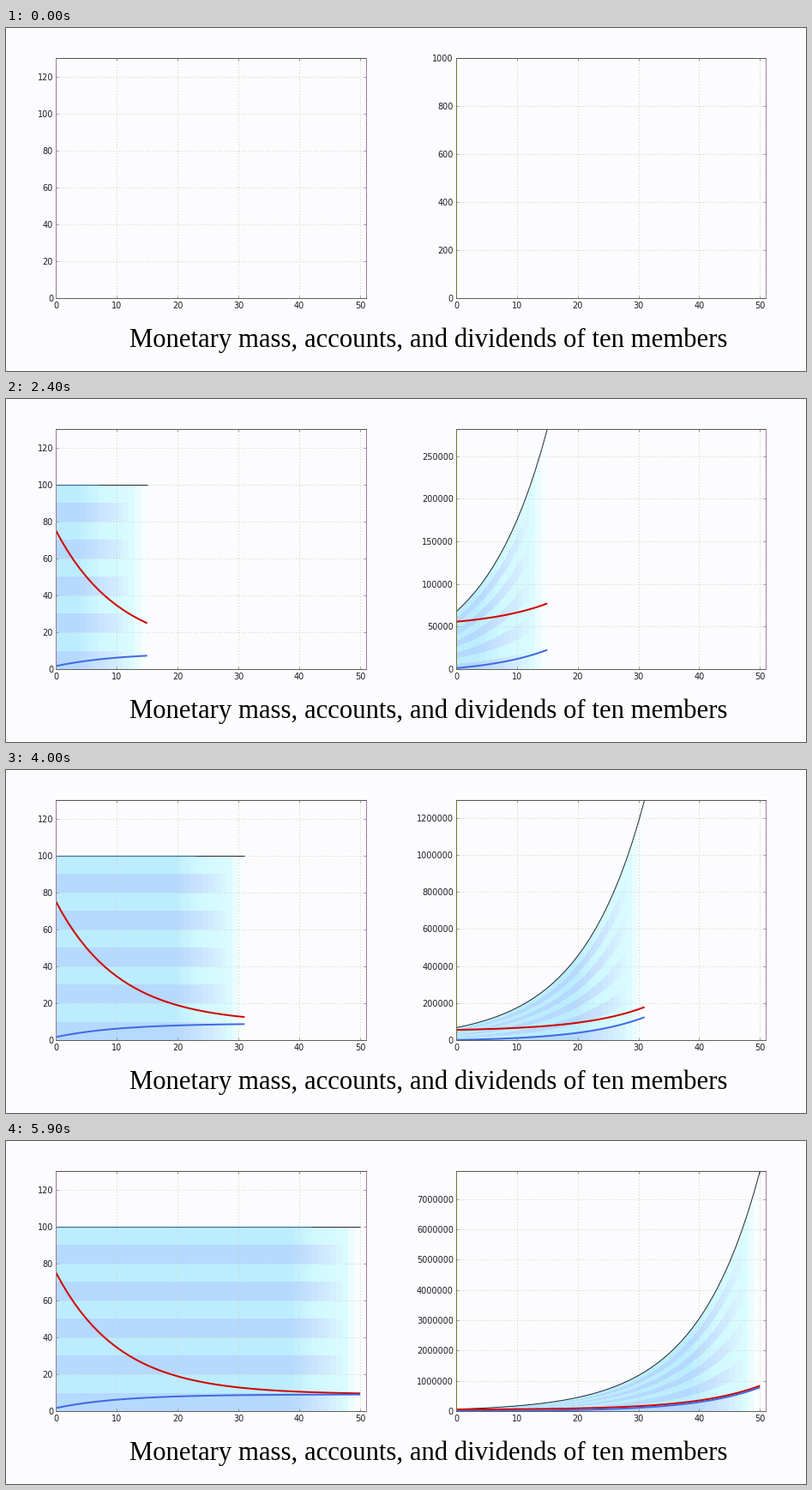
Recreate the animation shown at these times as a matplotlib script. Size 933 px wide and 400 px high, loop 6000 ms.

```python
import numpy as np
import matplotlib.pyplot as plt
from matplotlib.animation import FuncAnimation
from matplotlib.collections import PolyCollection
from matplotlib.colors import to_rgb
from matplotlib.ticker import FuncFormatter, MaxNLocator, MultipleLocator

W, H, DPI = 933, 400, 64
PX = 72 / DPI  # points per pixel
PAPER = "#fcfcff"
FRAMES, STEP_MS = 60, 100
LEAD, IDLE = 9, 5  # frames before year zero, frames with empty scales
YEARS, MEMBERS = 50, 10
GROWTH = 1.1
MASS0 = 67500

plt.rcParams["font.family"] = "DejaVu Sans"

# Fill colours by age in years, for even and odd bands
BLUE_BANDS = {1: "#f8fdff", 2: "#ebfcff", 3: "#dbfbff", 5: "#d4efff",
              8: "#c9e3ff", 12: "#b5d9ff"}
CYAN_BANDS = {1: "#f8fdff", 2: "#ebfcff", 3: "#dbfcff", 8: "#d0f8ff",
              12: "#bcedff"}


def mass(year):
    return MASS0 * GROWTH ** year


def rich(year):
    return mass(year) / MEMBERS + 49000


def newcomer(year):
    return mass(year) / MEMBERS - 5500


def percent(account):
    return lambda year: 100 * account(year) / mass(year + 1)


def full(year):
    return 100 + 0 * year


def ramp(ages, stops):
    colors = np.array([to_rgb(c) for c in stops.values()])
    rgb = [np.interp(ages, list(stops), colors[:, k]) for k in range(3)]
    return np.column_stack(rgb + [(ages > 0).astype(float)])


def make_axes(x, width, side_color):
    ax = fig.add_axes([x / W, 1 - 315.1 / H, width / W, 280 / H])
    ax.set_facecolor(PAPER)
    ax.set_xlim(0, 51)
    ax.set_axisbelow("line")
    ax.xaxis.set_major_locator(MultipleLocator(10))
    ax.yaxis.set_major_formatter(FuncFormatter(lambda v, _: f"{v:.0f}"))
    ax.tick_params(direction="in", top=True, right=True, length=3 * PX,
                   width=0.7 * PX, color="#77777f",
                   labelsize=9.7 * PX, labelcolor="#1c1c20")
    ax.tick_params(axis="x", pad=4.1 * PX)
    ax.tick_params(axis="y", pad=3.1 * PX)
    for axis, color in (("x", "#cdcdbe"), ("y", "#cecec8")):
        ax.grid(axis=axis, color=color, lw=PX, ls=(0, (1, 2.5)))
    sides = {"top": "#5a5250", "bottom": "#655e58",
             "left": side_color, "right": "#a47ca0"}
    for side, color in sides.items():
        ax.spines[side].set(color=color, linewidth=PX)
    return ax


class Chart:
    def __init__(self, ax, total, high, low):
        self.ax = ax
        self.bands = []
        for k in range(MEMBERS):
            quads = [self.quad(total, k, x) for x in range(YEARS)]
            band = PolyCollection(quads, linewidths=0, edgecolors="none",
                                  antialiaseds=False, zorder=1)
            ax.add_collection(band, autolim=False)
            self.bands.append((band, CYAN_BANDS if k % 2 else BLUE_BANDS))
        styles = ((total, "#2a2a2e", 1), (high, "#d20000", 2),
                  (low, "#4169e1", 2))
        self.curves = [(f, ax.plot([], [], color=c, lw=w * PX,
                                   solid_capstyle="butt")[0])
                       for f, c, w in styles]

    @staticmethod
    def quad(total, k, x):
        left, right = total(x) / MEMBERS, total(x + 1) / MEMBERS
        return [(x, k * left), (x + 1, k * right),
                (x + 1, (k + 1) * right), (x, (k + 1) * left)]

    def show(self, year):
        ages = year - np.arange(YEARS)
        for band, stops in self.bands:
            band.set_facecolor(ramp(ages, stops))
        years = np.arange(0, year + 1)
        for curve, line in self.curves:
            line.set_data(years, curve(years))


fig = plt.figure(figsize=(W / DPI, H / DPI), dpi=DPI, facecolor=PAPER)

share_ax = make_axes(58.2, 362, "#9a7a96")
share_ax.set_ylim(0, 130)
share_ax.yaxis.set_major_locator(MultipleLocator(20))

money_ax = make_axes(525, 361.4, "#75703c")
money_ax.yaxis.set_major_locator(MaxNLocator(9, steps=[1, 2, 5, 10]))

charts = [Chart(share_ax, full, percent(rich), percent(newcomer)),
          Chart(money_ax, mass, rich, newcomer)]

# The older part of the total line turns blue
aged_total, = share_ax.plot([], [], color="#3f6a96", lw=1.2 * PX,
                            solid_capstyle="butt")

fig.text(144.5 / W, 1 - 372 / H,
         "Monetary mass, accounts, and dividends of ten members",
         family="Liberation Serif", size=30.7 * PX, color="black",
         ha="left", va="baseline")


def draw(i):
    year = i - LEAD
    money_ax.set_ylim(0, 1000 if i < IDLE else mass(year))
    for chart in charts:
        chart.show(year)
    aged = year - 8
    aged_total.set_data([0, aged] if aged > 2 else [],
                        [100, 100] if aged > 2 else [])
    return []


anim = FuncAnimation(fig, draw, frames=FRAMES, interval=STEP_MS,
                     init_func=lambda: draw(0), repeat=True, repeat_delay=0,
                     blit=False)
plt.show()
```
